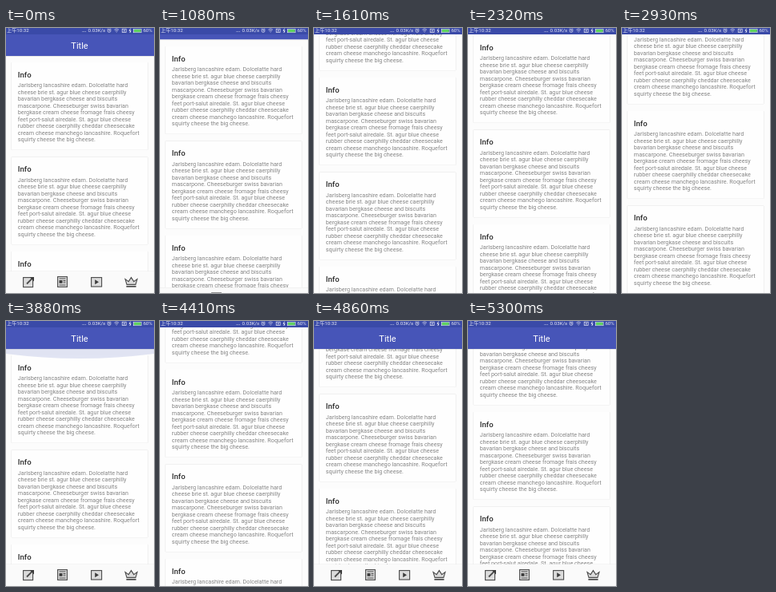
These frames come from a looping animation (185 px wide and 332 px high, 6.16 s). An HTML page:

```html
<!DOCTYPE html>
<html lang="en">
<head>
<meta charset="utf-8">
<title>Scrolling cards</title>
<style>
  html, body { margin: 0; width: 100%; height: 100%; overflow: hidden; background: #fcfcfc; }
  svg { display: block; width: 185px; height: 332px; font-family: Roboto, sans-serif; }
  .sheet { fill: #fefefe; filter: drop-shadow(0 .8px .6px rgba(0, 0, 0, .2)); }
  .head { font-size: 9.6px; font-weight: 500; fill: #2b2b2b; }
  .body { font-size: 7.24px; fill: #858585; }
  .title { font-size: 11px; fill: #fff; text-anchor: middle; }
  .status { font-size: 6.2px; fill: #e8eaf6; font-family: Roboto, "Noto Sans CJK SC", "Noto Sans CJK", sans-serif; }
  .tiny { fill: none; stroke: #e8eaf6; stroke-width: .7; }
  .icon { fill: #dcdcdc; stroke: #4a4a4a; stroke-width: 1.1; }
  .icon .solid { fill: #3c3c3c; stroke: none; }
  .glow { fill: #3f51b5; opacity: .15; }
</style>
</head>
<body>
<svg viewBox="0 0 185 332">
  <defs>
    <g id="card">
      <rect class="sheet" x="6.5" y="43" width="171" height="109.8" rx="1"/>
      <text class="head" x="14.7" y="61.6">Info</text>
      <g class="body" id="lines"></g>
    </g>
  </defs>
  <rect width="185" height="332" fill="#fcfcfc"/>
  <g id="list"></g>
  <path class="glow" id="topGlow"/>
  <path class="glow" id="endGlow"/>

  <g id="nav">
    <rect y="304.6" width="185" height="1" fill="#e6e6e6"/>
    <rect y="305" width="185" height="28" fill="#fafafa"/>
    <g class="icon">
      <rect x="21.6" y="312.6" width="12" height="12"/>
      <path d="M26 320.5L32.6 313.8" stroke-width="1.8"/>
      <path class="solid" d="M29.5 312H35V317.5Z"/>
      <rect x="64.6" y="311.6" width="11.8" height="12.8"/>
      <path d="M66.5 314H74.5M71.5 316.6H74.5M71.5 319H74.5M66.5 322H74.5"/>
      <rect class="solid" x="66.5" y="316" width="4" height="3.8"/>
      <rect x="106.6" y="312.6" width="13" height="11.4"/>
      <path class="solid" d="M111.2 315.3L116 318.3L111.2 321.3Z"/>
      <path d="M151 321.4L149 314.6L153.2 317.6L156.5 312.6L159.8 317.6L164 314.6L162 321.4Z"/>
      <path d="M150.4 323.8H162.6" stroke-width="1.8"/>
    </g>
  </g>

  <g id="bar">
    <rect y="35" width="185" height="1" fill="#000" opacity=".08"/>
    <rect y="8" width="185" height="27" fill="#4755b8"/>
    <text class="title" x="92" y="25.7">Title</text>
  </g>

  <rect width="185" height="8" fill="#3a4aa8"/>
  <g class="status">
    <text x="1" y="5.4">上午10:32</text>
    <text x="95" y="5.2" font-weight="700">...</text>
    <text x="102.6" y="5.4">0.03K/s</text>
    <text x="171.4" y="5.4">60%</text>
  </g>
  <g class="tiny">
    <circle cx="129" cy="3.4" r="2"/>
    <path d="M129 2.2V3.5H130M126.6 1.5L127.6 .8M131.4 1.5L130.4 .8"/>
    <path d="M135.4 2.2Q138.2 -.2 141 2.2M136.5 3.7Q138.2 2.3 139.9 3.7M138.2 4.6V5.6"/>
    <rect x="145.2" y="1.2" width="5" height="4.4"/>
    <path d="M146.5 2.2L149 4.6M149 2.2L146.5 4.6"/>
    <path d="M155.6 .8L154.2 3.4H156L154.8 6" stroke-width="1"/>
    <rect x="159.5" y="1.3" width="9.6" height="4.4"/>
  </g>
  <rect x="160" y="1.8" width="8.6" height="3.4" fill="#5fd35f"/>
</svg>
<script>
const LOOP = 6160, PITCH = 118.5, CARDS = 4;
const $ = id => document.getElementById(id);

const copy = `Jarlsberg lancashire edam. Dolcelatte hard
cheese brie st. agur blue cheese caerphilly
bavarian bergkase cheese and biscuits
mascarpone. Cheeseburger swiss bavarian
bergkase cream cheese fromage frais cheesy
feet port-salut airedale. St. agur blue cheese
rubber cheese caerphilly cheddar cheesecake
cream cheese manchego lancashire. Roquefort
squirty cheese the big cheese.`;

$('lines').innerHTML = copy.split('\n')
  .map((s, i) => `<text x="14.8" y="${74.3 + i * 8.52}">${s}</text>`).join('');
$('list').innerHTML = Array.from({ length: CARDS },
  (_, i) => `<use href="#card" y="${i * PITCH}"/>`).join('');

// Bursts of screen updates: start, end, number of updates
const bursts = [
  [1080, 1610, 7], [2140, 2670, 7], [2760, 2930, 3], [3190, 3790, 8],
  [3880, 4410, 7], [4500, 5040, 7], [5120, 5300, 3]
];

// Keys: time, value, easing into the key
const linear = p => p;
const out = p => 1 - (1 - p) ** 2.2;
const both = p => p * p * (3 - 2 * p);

const scroll = [
  [1000, 0], [1080, 20], [1610, 99.5, out],
  [2052, 99.5], [2670, 174.5, out], [2930, 176, out],
  [3100, 176], [3620, 0, both],
  [3900, 0], [4410, 100.5, out], [4590, 112, out],
  [5300, 47.5, out]
];
const hide = [
  [1000, 0], [1080, 20 / 27], [1168, 1], [3100, 1], [3280, 0],
  [3900, 0], [4050, 1], [4590, 1], [4770, 0]
];
const topPull = [[3540, 0], [3710, 1.3], [3880, 1], [4130, 0]];
const endPull = [[2500, 0], [2670, .8], [2930, 0]];

function sample(keys, t) {
  const i = keys.findIndex(k => k[0] >= t);
  if (i < 0) return keys[keys.length - 1][1];
  if (i === 0) return keys[0][1];
  const [t0, a] = keys[i - 1], [t1, b, ease = linear] = keys[i];
  return a + (b - a) * ease((t - t0) / (t1 - t0));
}

function screenTime(t) {
  let shown = 0;
  for (const [a, b, n] of bursts) {
    if (t < a) break;
    const step = (b - a) / (n - 1);
    shown = a + Math.min(n - 1, Math.floor((t - a) / step + .02)) * step;
  }
  return shown;
}

const shift = (id, y) => $(id).setAttribute('transform', `translate(0 ${y.toFixed(2)})`);

function glow(id, y, pull, dir) {
  const side = y + dir * 6 * pull, mid = y + dir * 18 * pull;
  $(id).setAttribute('d', pull ? `M0 ${y}H185V${side}Q92.5 ${mid} 0 ${side}Z` : '');
}

function draw(now) {
  const t = screenTime(now % LOOP);
  const h = sample(hide, t);
  shift('list', -sample(scroll, t));
  shift('nav', 27.5 * h);
  shift('bar', -28 * h);
  glow('topGlow', 35, sample(topPull, t), 1);
  glow('endGlow', 332, sample(endPull, t), -1);
}

const start = performance.now();
function tick() {
  draw(performance.now() - start);
  requestAnimationFrame(tick);
}
tick();
</script>
</body>
</html>
```
